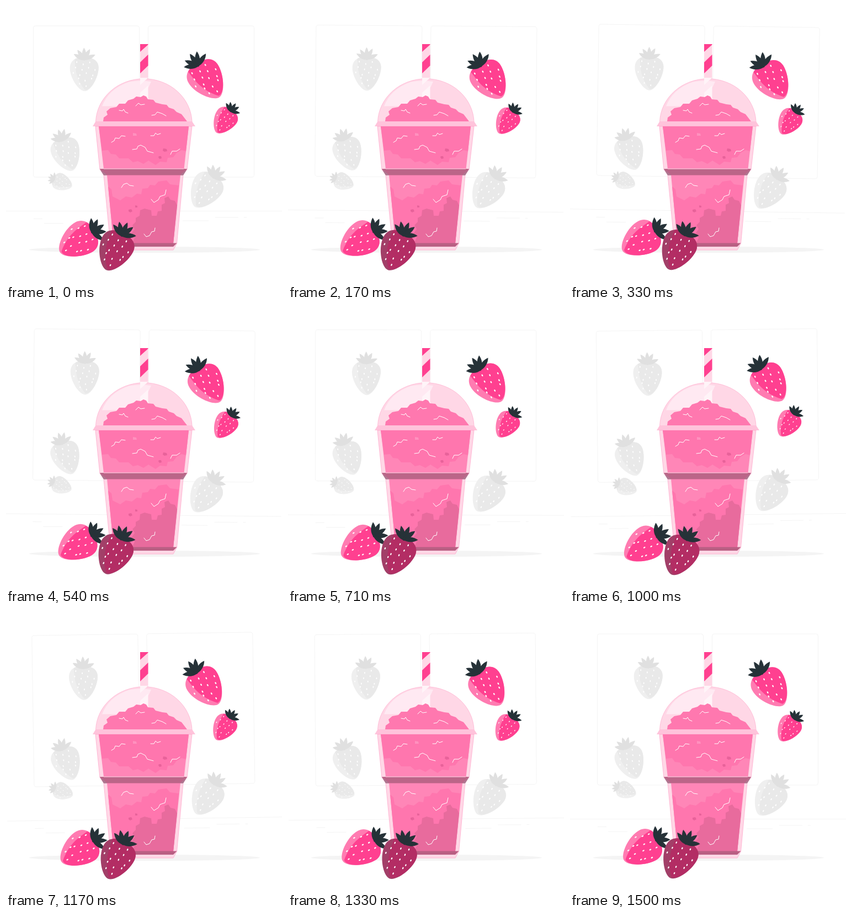
Animation of 500x500 px, one loop 1.54 s. Source, as an HTML page:

```html
<!DOCTYPE html>
<html lang="en">
<head>
<meta charset="utf-8">
<title>Strawberry smoothie</title>
<style>
  html, body { margin: 0; width: 100%; height: 100%; overflow: hidden; background: #fff; }
  svg { display: block; width: 100vw; height: 100vh; }
</style>
</head>
<body>
<svg viewBox="0 0 500 500">
  <g id="room" fill="none" stroke="#f4f4f4">
    <rect x="49.5" y="36" width="192" height="274" rx="4"/>
    <rect x="257.5" y="36" width="192" height="274" rx="4"/>
    <path d="M0 371.5H500M50 385.500H66M69 394H104M379 383H421M431 383H436M320 389H367"/>
  </g>
  <g id="pale"></g>
  <ellipse cx="251" cy="441.5" rx="209" ry="5.700" fill="#f4f4f4"/>

  <g id="cup">
    <path d="M243 69h14.500v70h-14.500z" fill="#ffd7e6"/>
    <path d="M243 69H257.500V70L243 83ZM243 102L257.500 88V108L243 122Z" fill="#ff4090"/>
    <path d="M162.500 210A87.300 81 0 0 1 337 210Z" fill="#ffd7e6" stroke="#ffb3d1" stroke-width=".8"/>
    <path d="M174 181.500Q186 150 223 137.500Q242 134 263 137Q257 153 241 168Q231 181 218 181.500Z" fill="#ffe9f2"/>
    <path d="M243 130h14.500l-14.500 13zM243 162V157L257.500 144V169H243Z" fill="#fff4f8"/>
    <path d="M176 209L177 202 184 197 182 191 189 185 200 183 205 177 216 177 221 171 231 168 236 164 244 165 249 162 254 164 257 169 267 170 271 175 283 178 291 179 295 184 304 187 309 192 318 196 328 209Z" fill="#ff78af"/>
    <path d="M162.500 209H337L343 218H157Z" fill="#ffc3db"/>

    <path d="M162 218H337L328 296 321 306 309.500 430 303 442H192L189 430 177 306 170 296Z" fill="#ffd7e6" stroke="#ffa9cc" stroke-width=".8"/>
    <path d="M168 218H331L322.500 295H177Z" fill="#ff86b7"/>
    <path d="M168 218H331L326 263 318 261 309 266 303 274 293 275 291 283 279 282 271 288 258 280 249 286 239 281 230 283 222 276 205 276 199 269 190 268 185 261 174 262Z" fill="#ff76ae"/>
    <path d="M183 306H316L303 430H195Z" fill="#ff86b7"/>
    <path d="M185 327L191 332 193 345 207 352 217 345 228 347 237 340 245 341 247 331 257 330 261 324 270 325 276 318 291 316 297 323 313 325 303 430H195Z" fill="#ff76ae"/>
    <path d="M228 430L233 420 228 411 233 404 229 397 235 391 235 384 242 380 243 370 251 367 263 370 264 380 273 380 275 372 282 371 282 360 288 357 287 348 294 345 298 351 306 353 310 361 303 430Z" fill="#e86b9d"/>

    <path d="M170 295H328L321 306.500H177Z" fill="#bb6588"/>
    <path d="M170 295L183 306.500H177ZM328 295L316 306.500H321Z" fill="#ad7891"/>
    <path d="M177 295H322" stroke="#ffd7e6"/>
    <path d="M189 429.500H309.500L303 436H192Z" fill="#b95f83"/>

    <g fill="#e8629a">
      <path d="M285 258l6 1 1 4-5 1-3-2zM277 272l4 0 1 4-4 1-2-3zM222 369l5-1 2 4-4 2-3-2zM234 361l4 1 0 3-4 0z"/>
      <path d="M230 230l6 1 1 4-7 0z" fill="#ff91be"/>
    </g>
    <g fill="none" stroke="#fff" stroke-linejoin="round" stroke-linecap="round">
      <path d="M205 189l6 1 2-3 3 5 5 2M235 181l5-5 4 3 7-1M264 198l6-1 4-5 9 3 7 4"/>
      <path d="M191 247l5-3 2-5 7 1 4-5 7 1M262 235l6 0 3-5 3 3 6-2M229 260l8-1 2-5 5-2 8 4 4 7 11 3"/>
      <path d="M298 269l3-6 8 0 6-4M209 329l4-6 6-2 5 4 7 1M263 350l5 6 8-5 3-6 9-3 2-9M250 413l4 5 6-2 4-7 5-1 1-6"/>
    </g>
  </g>
  <g id="fresh"></g>
</svg>
<script>
const get = id => document.getElementById(id);

function seeds() {
  let out = '';
  [[5, 3], [15, 4], [25, 4], [35, 3], [45, 2]].forEach(([y, count], row) => {
    for (let i = 0; i < count; i++) {
      const x = (i - (count - 1) / 2) * 12 + (row % 2 ? 2 : -2);
      out += `<ellipse cx="${x}" cy="${y + (i % 2) * 4}" rx="1" ry="1.7"/>`;
    }
  });
  return out;
}

// Leaf base sits at (x, y); the fruit tip points down before turning.
function berry(x, y, size, turn, main, side, leaf) {
  const leaves = [-64, -37, -3, 27, 65].map(a =>
    `<path d="M0 2C-6 -6 -4.500 -15 0 -22C4.500 -15 5 -6 0 2Z" transform="rotate(${a})"/>`).join('');
  return `<g transform="translate(${x} ${y}) rotate(${turn}) scale(${size})">
    <path fill="${side}" d="M0 -2C12 -6 26 0 26.500 14C27 32 13 58 2 58.500C-9 59 -27 34 -26.500 15C-26 0 -12 -6 0 -2Z"/>
    <path fill="${main}" d="M-18 0C-16 12 -18 32 2 56C13 58 27 32 26.500 14C26 0 12 -6 0 -2C-8 -5 -14 -3 -18 0Z"/>
    <g fill="#fff">${seeds()}</g><g fill="${leaf}">${leaves}</g></g>`;
}

const gray = ['#e9e9e9', '#efefef', '#e0e0e0'];
const pink = ['#ff4090', '#ff7bb1', '#263238'];
const wine = ['#b32d64', '#a23f68', '#263238'];

get('pale').innerHTML = [
  [142, 97, .98, 1], [102, 244, .98, -17], [88, 314, .58, -66], [376, 311, 1.07, 34]
].map(b => berry(...b, ...gray)).join('');

get('fresh').innerHTML =
  berry(348, 108, 1.18, -32, ...pink) +
  berry(407, 191, .79, 35, ...pink) +
  berry(156, 410, 1.17, 60, ...pink) +
  berry(210, 416, 1.17, 26, ...wine);

const sway = [['room', 250, 215], ['pale', 240, 222], ['fresh', 260, 281]];

// One 1500 ms sway to +1 and -1 degree, then a short rest.
function frame(now) {
  const p = Math.min(now % 1540 / 1500, 1);
  const angle = p < .25 ? 4 * p : p < .75 ? 2 - 4 * p : 4 * p - 4;
  for (const [id, x, y] of sway) get(id).setAttribute('transform', `rotate(${angle} ${x} ${y})`);
  requestAnimationFrame(frame);
}
frame(0);
requestAnimationFrame(frame);
</script>
</body>
</html>
```
